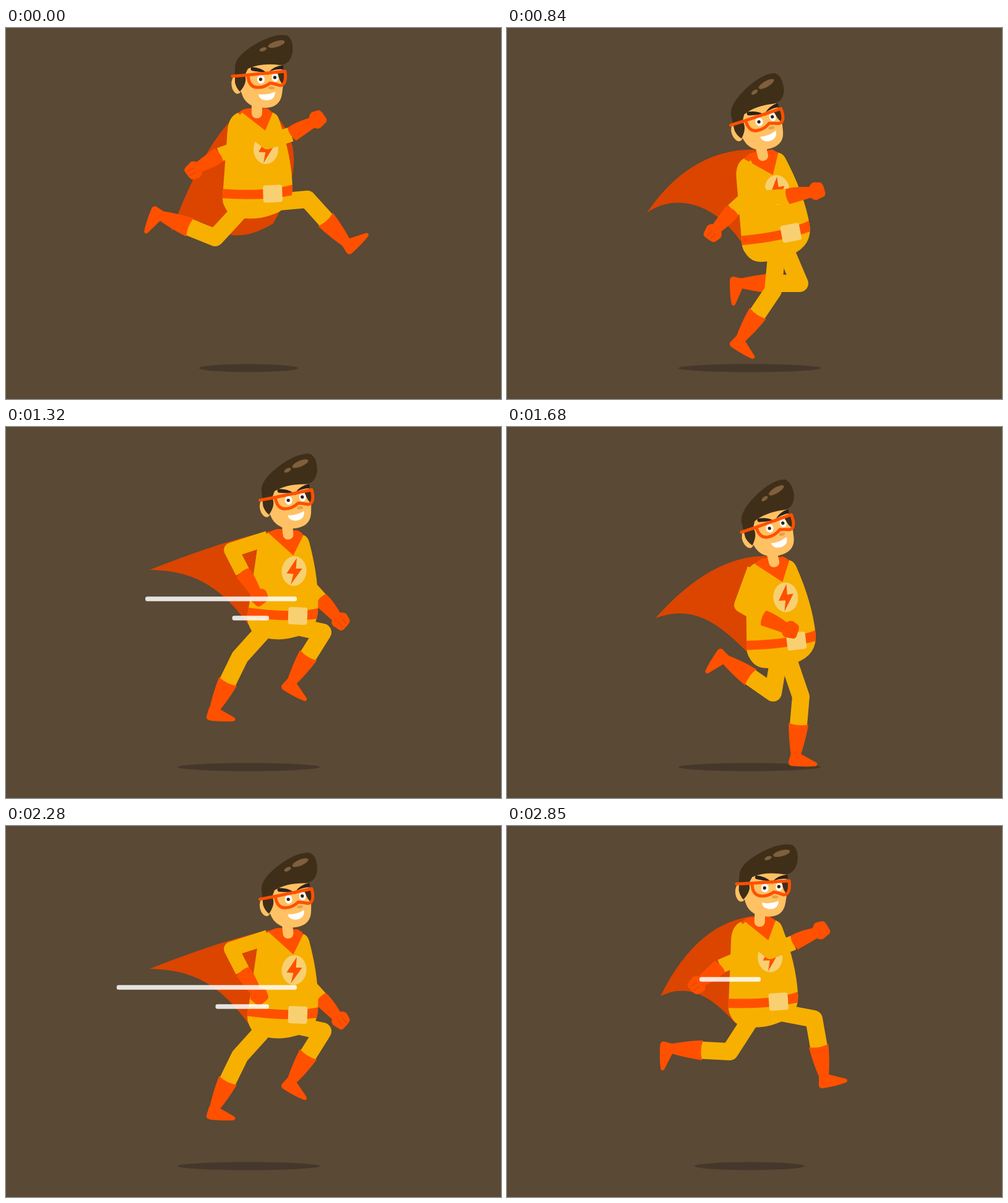
Write an HTML page with a canvas that moves like this. It is 800x600 px and loops after 2.88 s.

```html
<!DOCTYPE html>
<html lang="en">
<head>
<meta charset="utf-8">
<title>Running hero</title>
<style>
html, body { margin: 0; width: 100%; height: 100%; overflow: hidden; background: #594935; }
canvas { display: block; width: 800px; height: 600px; }
</style>
</head>
<body>
<canvas id="stage" width="800" height="600"></canvas>
<script>
const ctx = document.getElementById('stage').getContext('2d');
const LOOP = 2880, STRIDE = 960, STEP = 30;
const YELLOW = '#f7b000', RED = '#ff5000', CAPE = '#db4500', SKIN = '#ffc163',
      HAIR = '#3f2f19', CREAM = '#f8d071', DARK = '#2e2119';

// Pose times within one stride; every table below has one row per time.
const TIMES = [0, 120, 240, 360, 480, 600, 720, 840, 930];

// neck x, neck y, torso turn, head turn
const BODY = [
  [405, 133, 0, 0], [412, 202, -9, -9.5], [433, 214, -3, -10],
  [455, 169, 4, -6], [455, 131, 3, 0], [448, 169, -1, -11],
  [430, 214, -5, -14], [412, 202, -9, -13], [408, 150, -2, 2]
];
// knee x, knee y (from the neck), shin angle, foot tilt
const FAR_LEG = [
  [82, 144, 48, 0], [83, 198, 85, 0], [20, 222, 105, 0],
  [-77, 203, 116, -20], [-72, 203, 190, 0], [-60, 208, 200, 0],
  [0, 216, 215, 0], [61, 211, 180, 0], [88, 162, 80, 0]
];
const NEAR_LEG = [
  [-67, 206, 202, 0], [-38, 215, 228, 0], [30, 208, 175, 0],
  [57, 163, 122, 0], [75, 140, 28, 0], [50, 213, 62, 0],
  [45, 222, 95, 0], [18, 223, 124, 0], [-48, 215, 183, 0]
];
// upper arm, forearm and glove angles
const NEAR_ARM = [
  [38, -18, -29], [62, -3, -10], [110, 30, 25],
  [162, 63, 57], [172, 73, 64], [158, 55, 56],
  [110, 30, 25], [62, -3, -10], [39, -21, -24]
];
// cuff x, cuff y (from the neck), glove angle
const FAR_ARM = [
  [-60, 72, 149], [-47, 93, 132], [5, 105, 90],
  [53, 109, 48], [66, 92, 37], [60, 106, 43],
  [5, 105, 90], [-47, 93, 132], [-63, 77, 142]
];
// tip, top bend, two lower bends, lower anchor, right bulge
const CLOAK = [
  [-138, 195, -62, -3, -75, 142, -70, 242, 27, 183, 95],
  [-221, 102, -144, -31, -177, 68, -147, 68, -82, 138, 10],
  [-222, 75, -110, -20, -165, 60, -110, 85, -60, 145, 10],
  [-223, 62, -70, 2, -155, 63, -110, 86, -63, 151, 10],
  [-235, 70, -90, -12, -175, 55, -110, 80, -55, 150, 10],
  [-187, 102, -78, -5, -118, 91, -105, 131, -48, 162, 10],
  [-190, 95, -95, -12, -135, 75, -95, 95, -42, 150, 10],
  [-186, 97, -112, -12, -147, 68, -82, 73, -32, 146, 10],
  [-160, 125, -98, 0, -123, 107, -85, 115, -38, 170, 10]
];
// start, right end, y, length, px per ms
const STREAKS = [
  [238, 470, 295, 304, 1.6], [324, 425, 326, 90, .9],
  [1167, 470, 278, 304, 1.6], [1254, 425, 309, 90, .9],
  [1980, 410, 285, 99, 1.65],
  [2098, 470, 261, 304, 1.6], [2184, 425, 292, 90, .9],
  [2790, 410, 248, 99, 1.65]
];

const TORSO = new Path2D('M-30 4Q-45 10 -47 32L-54 127Q-57 147 -52 155Q-45 172 -28 174Q0 178 22 170Q58 160 58 126Q57 75 36 14Q33 5 24 3Z');
const BELT = new Path2D('M-60 127Q20 133 62 119L60 137Q10 147 -60 142Z');
const COLLAR = new Path2D('M-30 5Q-22 -3 -14 -3L17 -3Q22 0 26 4L12 38Z');
const BOLT = new Path2D('M4 -21L-12 4L-1 5L-5 22L13 -4L3 -4Z');
const GLOVE = new Path2D('M0 -12Q12 -14 38 -9Q42 -15 47 -15L56 -13Q60 -12 61 -5L62 5Q62 10 57 11L46 14Q40 13 38 9L2 13Q-4 0 0 -12Z');
const KNUCKLES = new Path2D('M47 -5L58 -4M46 3L58 4');
const BOOT = new Path2D('M44 -16Q49 0 44 16Q70 14 99 7L98 -7Q70 -14 44 -16Z');
const FOOT = new Path2D('M92 8L108 11Q113 10 113 4Q113 -20 110 -34Q107 -38 104 -34Q97 -18 92 -7Z');
const FACE = new Path2D('M378 75L392 58L445 56Q450 85 446 107Q443 127 422 129Q396 131 385 115Q376 100 378 75Z');
const HAIRDO = new Path2D('M370 88L370 62Q372 44 405 25Q435 8 454 12Q465 18 463 40Q459 59 443 60Q412 56 391 66L386 76Q391 88 378 103Q372 97 370 88Z');
const SIDE = new Path2D('M439 73L451 71L448 92Q442 87 439 73Z');
const FRAME = new Path2D('M366 78L391 76L451 70Q454 92 443 93Q434 90 427 89Q417 97 405 96Q392 95 391 76');
const BRIDGE = new Path2D('M414 72L424 76L432 70Z');
const BROWS = new Path2D('M397 63Q412 64 421 72Q407 71 397 69Q394 66 397 63ZM425 71Q433 62 447 60Q450 64 447 67Q436 66 425 71Z');
const MOUTH = new Path2D('M408 107Q422 109 435 103Q435 117 420 117Q409 116 408 107Z');

const rad = a => a * Math.PI / 180;
const reach = ([x, y], len, a) => [x + len * Math.cos(rad(a)), y + len * Math.sin(rad(a))];
const turn = ([x, y], a) => {
  const c = Math.cos(rad(a)), s = Math.sin(rad(a));
  return [x * c - y * s, x * s + y * c];
};

function fill(path, color) {
  ctx.fillStyle = color;
  ctx.fill(path);
}

function oval(x, y, rx, ry, color, tilt = 0) {
  ctx.beginPath();
  ctx.ellipse(x, y, rx, ry, rad(tilt), 0, 7);
  ctx.fillStyle = color;
  ctx.fill();
}

function bar(x, y, w, h, r, color) {
  ctx.beginPath();
  ctx.roundRect(x, y, w, h, r);
  ctx.fillStyle = color;
  ctx.fill();
}

function limb(points, width) {
  ctx.beginPath();
  points.forEach(p => ctx.lineTo(...p));
  ctx.lineWidth = width;
  ctx.lineJoin = 'round';
  ctx.lineCap = 'butt';
  ctx.strokeStyle = YELLOW;
  ctx.stroke();
}

function at([x, y], angle, draw) {
  ctx.save();
  ctx.translate(x, y);
  ctx.rotate(rad(angle));
  draw();
  ctx.restore();
}

// Straight blend between the two poses around the given phase.
function poser(phase) {
  let i = TIMES.length - 1;
  while (TIMES[i] > phase) i--;
  const j = (i + 1) % TIMES.length;
  const k = (phase - TIMES[i]) / ((TIMES[j] || STRIDE) - TIMES[i]);
  return table => table[i].map((v, n) => v + (table[j][n] - v) * k);
}

function glove(cuff, angle, lines) {
  at(cuff, angle, () => {
    fill(GLOVE, RED);
    if (!lines) return;
    ctx.strokeStyle = CAPE;
    ctx.lineWidth = 1.3;
    ctx.stroke(KNUCKLES);
  });
}

function leg([kx, ky, shin, tilt], lean) {
  const knee = [kx, ky];
  const hip = turn([-2 + kx * .2, 150], lean);
  limb([hip, knee, reach(knee, 48, shin)], 28);
  at(knee, shin, () => {
    fill(BOOT, RED);
    ctx.translate(96, 0);
    ctx.rotate(rad(tilt));
    ctx.translate(-96, 0);
    fill(FOOT, RED);
  });
}

function cloak([tx, ty, cx, cy, ax, ay, bx, by, ex, ey, bulge]) {
  ctx.beginPath();
  ctx.moveTo(0, -5);
  ctx.quadraticCurveTo(cx, cy, tx, ty);
  ctx.bezierCurveTo(ax, ay, bx, by, ex, ey);
  ctx.quadraticCurveTo(bulge, 65, 24, 2);
  ctx.fillStyle = CAPE;
  ctx.fill();
}

function torso() {
  fill(TORSO, YELLOW);
  ctx.save();
  ctx.clip(TORSO);
  fill(BELT, RED);
  ctx.restore();
  at([26, 135], -2, () => bar(-15.5, -14, 31, 28, 4, CREAM));
  fill(COLLAR, RED);
  oval(15, 63, 20, 24, CREAM);
  at([15, 63], -3, () => fill(BOLT, RED));
}

function head() {
  ctx.translate(-405, -133);
  bar(397, 115, 17, 31, 8, SKIN);
  oval(373, 92, 8.5, 14.5, SKIN, -8);
  fill(FACE, SKIN);
  fill(HAIRDO, HAIR);
  oval(437, 26, 14, 4.8, '#7f5f3c', -17);
  oval(415.5, 34.5, 6, 3, '#7f5f3c', -22);
  fill(SIDE, HAIR);
  oval(412, 83, 6, 7, '#fff');
  oval(435, 80, 5.5, 7, '#fff');
  oval(411.5, 83, 2.7, 2.7, DARK);
  oval(434.5, 80, 2.7, 2.7, DARK);
  oval(429, 97, 5, 2.5, '#e9a044');
  fill(BROWS, DARK);
  fill(BRIDGE, RED);
  ctx.strokeStyle = RED;
  ctx.lineWidth = 5;
  ctx.lineJoin = ctx.lineCap = 'round';
  ctx.stroke(FRAME);
  fill(MOUTH, '#fff');
}

function streaks(t) {
  for (const [start, right, y, len, speed] of STREAKS) {
    const run = (t - start) * speed;
    if (run <= 0 || run >= len * 2) continue;
    const front = Math.min(run, len), back = Math.max(0, run - len);
    bar(right - front, y - 3.7, front - back, 7.4, 3.2, 'rgba(255,255,255,.85)');
  }
}

function draw(t) {
  const phase = t % STRIDE;
  const pose = poser(phase);
  const [x, y, lean, nod] = pose(BODY);

  ctx.fillStyle = '#594935';
  ctx.fillRect(0, 0, 800, 600);
  const hop = Math.min(phase % 480, 480 - phase % 480);
  oval(392, 550, 80 + 35 * Math.min(1, hop / 120), 6.5, '#45382a');

  ctx.save();
  ctx.translate(x, y);
  cloak(pose(CLOAK));

  const [fx, fy, fa] = pose(FAR_ARM);
  limb([[0, 50], [fx, fy]], 23);
  glove([fx, fy], fa, true);

  leg(pose(FAR_LEG), lean);
  leg(pose(NEAR_LEG), lean);
  at([0, 0], lean, torso);

  const [upper, fore, hand] = pose(NEAR_ARM);
  const shoulder = turn([-31, 13], lean);
  const elbow = reach(shoulder, 62, upper);
  const cuff = reach(elbow, 40, fore);
  limb([shoulder, elbow, cuff], 24);
  glove(cuff, hand, false);

  at([0, 0], nod, head);
  ctx.restore();
  streaks(t);
}

const begin = performance.now();
function tick() {
  const t = (performance.now() - begin) % LOOP;
  draw(Math.floor(t / STEP) * STEP);
  requestAnimationFrame(tick);
}
tick();
</script>
</body>
</html>
```
